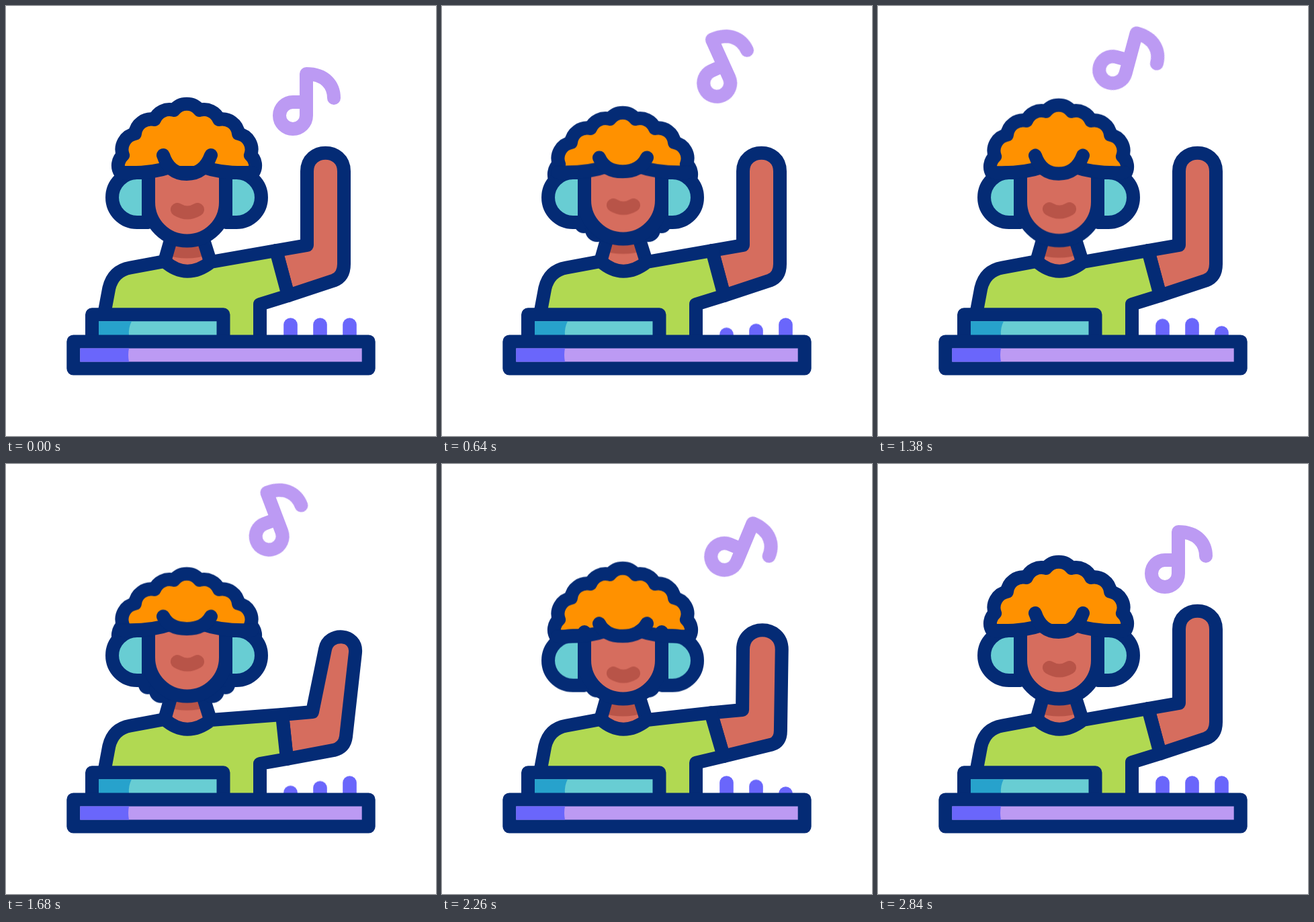
Write an HTML page without scripts that moves like this. It is 640 px wide and 640 px high and loops after 3.22 s.

```html
<!DOCTYPE html>
<html lang="en">
<head>
<meta charset="utf-8">
<title>DJ</title>
<style>
html, body { margin: 0; height: 100%; overflow: hidden; background: #fff; }
svg { display: block; width: 100vw; height: 100vh; }
svg * { animation: 3220ms cubic-bezier(.37, 0, .63, 1) infinite; }
.line { stroke: #042b75; stroke-width: 20; stroke-linecap: round; stroke-linejoin: round; }
.none { fill: none; }
.dark { fill: #042b75; }
.skin { fill: #d66d5e; }
.teal { fill: #68cdd3; }

/* head: --u and --d are the shifts when tilted up and down */
.nod { animation-name: nod; }
.hair { --u: 18px; --d: 10px; }
.pads { --u: 0px; --d: 8px; }
.face { --u: -4px; --d: 0px; }
.mouth { --u: -9px; --d: 9px; }
.shade { --u: -9px; --d: 0px; }
.brow { --u: -1px; --d: 9px; }
.fringe { --u: 0px; --d: 11.5px; --k: .65; transform-origin: 269px 236px; vector-effect: non-scaling-stroke; }
@keyframes nod {
  0%, 88.2%, 100% { transform: translateY(0) scaleY(1); }
  24.84%, 42.39%, 60.56% {
    transform: translateY(0) scaleY(1);
    animation-timing-function: cubic-bezier(.61, 1, .88, 1);
  }
  15.53%, 50.93% {
    transform: translateY(var(--u)) scaleY(var(--k, 1));
    animation-timing-function: cubic-bezier(.12, 0, .39, 0);
  }
  33.85% {
    transform: translateY(var(--d)) scaleY(var(--k, 1));
    animation-timing-function: cubic-bezier(.12, 0, .39, 0);
  }
  72.98% { transform: translateY(var(--d)) scaleY(var(--k, 1)); }
}

/* arm and shirt: raised, swung out, lowered */
.wave { d: var(--up); animation-name: wave; }
.arm {
  --up: path("M402 364L448 356L448 246C448 209.5 503 209.5 503 246L503 384Q503 403 488 408.5L420 431Z");
  --side: path("M411 373L456 369L475 276C480 249 523 252 520 281L506 406Q504 422 488 426L418 439Z");
  --low: path("M399.6 372.4L446.8 369.2L448 285.6C448 246.7 506.6 246.7 506.6 285.6L504.2 401Q504.2 416.8 491.6 420.5L418.8 436.4Z");
}
.shirt {
  fill: #b1d952;
  --up: path("M143 475L153.3 420Q159.5 394 185 389.5L236 380Q269 409 305 381L402 364L420 431L378 444L378 500");
  --side: path("M143 475L153.3 420Q159.5 394 185 389.5L236 380Q269 409 305 381L411 373L418 439L378 446L378 500");
  --low: path("M143 475L153.3 420Q159.5 394 185 389.5L236 380Q269 409 305 381L399.6 372.4L418.8 436.4L378 445L378 500");
}
@keyframes wave {
  0%, 17.39%, 19.88%, 41.61%, 44.1%, 61.49%, 63.98%, 85.71%, 100% { d: var(--up); }
  8.39%, 52.48% { d: var(--side); }
  29.19%, 73.29% { d: var(--low); }
}

.fader { stroke: #6a66fb; stroke-width: 20.6; stroke-linecap: round; }
.f1 { animation-name: fade1; }
.f2 { animation-name: fade2; }
.f3 { animation-name: fade3; }
@keyframes fade1 {
  0%, 7.76%, 31.06%, 40.68%, 64.6%, 100% { transform: none; }
  19.25%, 52.17% { transform: translateY(14.5px); }
}
@keyframes fade2 {
  0%, 12.42%, 43.48%, 44.1%, 76.4%, 100% { transform: none; }
  26.71%, 60.87% { transform: translateY(16px); }
}
@keyframes fade3 {
  0%, 22.36%, 52.8%, 54.04%, 88.2%, 100% { transform: none; }
  37.89%, 70.81% { transform: translateY(16px); }
}

.drift { animation-name: drift; }
.note {
  fill: none; stroke: #bc9af3; stroke-width: 20; stroke-linecap: round; stroke-linejoin: round;
  transform-origin: 447px 141.5px;
  animation-name: rise, sway;
}
@keyframes drift {
  0%, 7.45%, 69.57%, 100% { transform: none; }
  37.58% { transform: translateX(-78px); }
}
@keyframes rise {
  0%, 80.75%, 100% { translate: 0 0; }
  25.78%, 49.69% { translate: 0 -62px; }
}
@keyframes sway {
  0%, 88.2%, 100% { rotate: 0deg; }
  22.2%, 55.59% { rotate: -25deg; }
  37.89%, 72.05% { rotate: 24deg; }
}
</style>
</head>
<body>
<svg viewBox="0 0 640 640">
  <g class="drift">
    <path class="note" d="M447 143H427A20 20 0 1 0 447 163V101C475 101 488 118 488 137"/>
  </g>

  <!-- neck and body -->
  <path class="skin" d="M243 340H296L305 381Q269 409 235 381Z"/>
  <path class="nod shade" d="M243 335H296L302 370Q269 381 237 370Z" fill="#b85448"/>
  <path class="line none" d="M246 345L236 380M293 345L304 380"/>
  <path class="wave arm line skin"/>
  <path class="wave shirt line"/>

  <!-- head -->
  <g class="nod hair">
    <path class="line" fill="#ff9100" d="M170 248A20 20 0 0 1 174 222A24 24 0 0 1 192 190A24 24 0 0 1 221 169A24 24 0 0 1 250 155A24 24 0 0 1 288 155A24 24 0 0 1 317 169A24 24 0 0 1 346 190A24 24 0 0 1 364 222A20 20 0 0 1 368 248Z"/>
    <g class="dark">
      <circle cx="211" cy="311" r="14"/>
      <circle cx="231" cy="320" r="18"/>
      <circle cx="327" cy="311" r="14"/>
      <circle cx="307" cy="320" r="18"/>
    </g>
  </g>
  <path class="nod pads line teal" d="M212 248H195A37 37 0 0 0 195 322H212ZM327 248H343A37 37 0 0 1 343 322H327Z"/>
  <path class="nod face line skin" d="M212 250V292A57.5 57.5 0 0 0 327 292V250"/>
  <path class="nod mouth none" d="M255 303Q270 312 285 303" stroke="#b85448" stroke-width="20" stroke-linecap="round" stroke-linejoin="round"/>
  <path class="nod brow line none" d="M172 248Q215 250 243 240M366 248Q323 250 295 240"/>
  <path class="nod fringe line none" d="M234 222Q243 250 269 250Q295 250 305 222"/>

  <!-- mixer -->
  <path class="fader f1" d="M423.5 474.5V515"/>
  <path class="fader f2" d="M467.5 474.5V515"/>
  <path class="fader f3" d="M511.5 474.5V515"/>
  <path class="line teal" d="M128 499V459.3H323.5V499"/>
  <path d="M138 469.3H187Q182 479 183 490H138Z" fill="#27a2cc"/>
  <rect class="line" x="100.3" y="499.4" width="439.4" height="40.2" fill="#bc9af3"/>
  <path d="M110.3 509.4H183Q181 519 183 529.6H110.3Z" fill="#6a66fb"/>
</svg>
</body>
</html>
```
